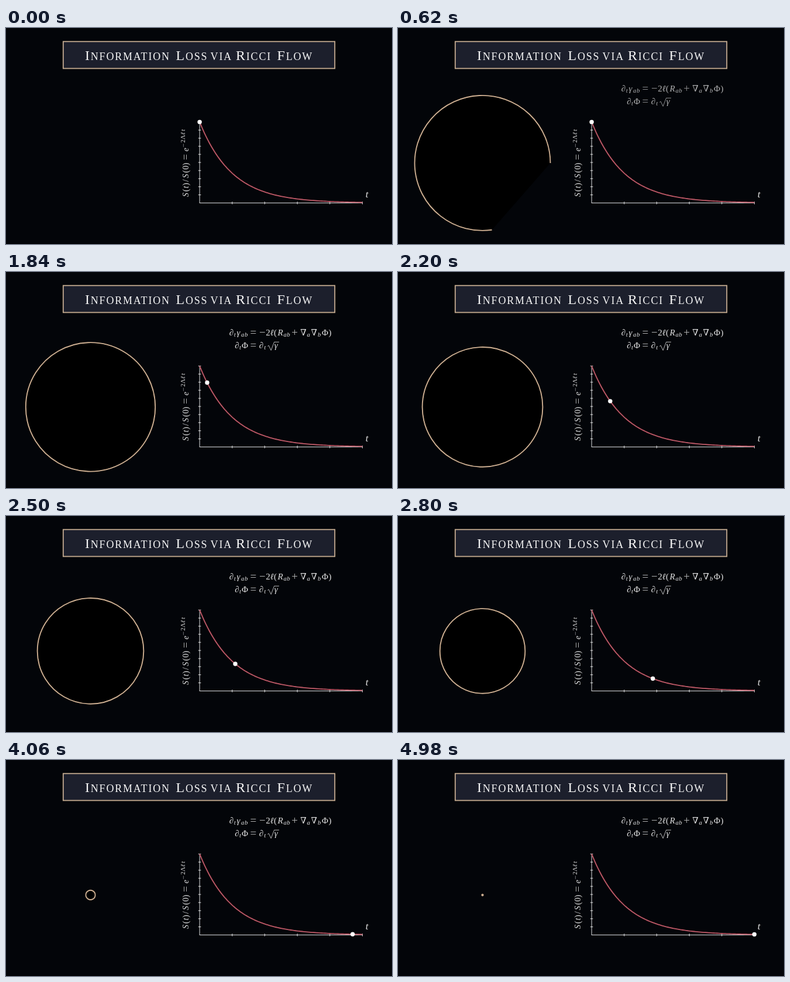
Recreate the animation shown at these times as an HTML page. Size 660 px wide and 371 px high, loop 5 s.

```html
<!DOCTYPE html>
<html lang="en">
<head>
<meta charset="utf-8">
<title>Information Loss via Ricci Flow</title>
<style>
  html, body { margin: 0; width: 100%; height: 100%; overflow: hidden; background: #030509; }
  svg { display: block; }
  text { font-family: "Liberation Serif", "DejaVu Serif", serif; fill: #e4e4e4; }
  .title { font-size: 18px; letter-spacing: 1.8px; fill: #f6f6f6; }
  .cap { font-size: 24px; }
  .it { font-style: italic; }
  .op { fill-opacity: .8; }
</style>
</head>
<body>
<svg width="660" height="371" viewBox="0 0 660 371">
  <rect y="370" width="660" height="1"/>
  <rect x="97.8" y="23.3" width="464.4" height="46.2" fill="#1c1f2c" stroke="#c6ac90" stroke-width="1.8"/>
  <text class="title" y="54.5">
    <tspan class="cap" x="135">I</tspan>NFORMATION
    <tspan class="cap" x="290.5">L</tspan>OSS
    <tspan x="349.6">VIA</tspan>
    <tspan class="cap" x="393">R</tspan>ICCI
    <tspan class="cap" x="463.5">F</tspan>LOW
  </text>
  <path id="ball" stroke="#d0b193" stroke-width="1.86"/>
  <g id="eqs">
    <path d="M447.3 127.6l1.9-1.4 4 8.3 5.4-14.2h8.4" fill="none" stroke="#e4e4e4" stroke-width=".8"/>
  </g>
  <g id="ylabel" transform="translate(312 290.5) rotate(-90)"></g>
  <g id="tlabel"></g>
  <path id="axes" stroke="#f0f0f0" stroke-width=".93"/>
  <path id="curve" fill="none" stroke="#be5866" stroke-width="1.86"/>
  <circle id="dot" r="3.7" fill="#fff"/>
</svg>
<script>
const $ = id => document.getElementById(id);
const OX = 331.1, OY = 300.5, W = 278.3, H = 139.1;
const CX = 144.5, CY = 231.9, R = 116;

function put(parent, y, size, cls, items) {
  for (const [x, str] of items) {
    const el = document.createElementNS("http://www.w3.org/2000/svg", "text");
    el.setAttribute("x", x);
    el.setAttribute("y", y);
    el.setAttribute("font-size", size);
    el.setAttribute("class", cls);
    el.textContent = str;
    $(parent).append(el);
  }
}

// Evolution equations
put("eqs", 108.8, 15, "it", [[381.8, "∂"], [394.6, "γ"], [451.8, "ℓ"], [464.4, "R"]]);
put("eqs", 108.8, 15, "", [[444.3, "2"], [458, "("], [503.2, "∇"], [521.6, "∇"], [540, "Φ"], [551.6, ")"]]);
put("eqs", 109.8, 19, "op", [[417.4, "="], [433, "−"], [488.2, "+"]]);
put("eqs", 111, 10.8, "it", [[389.8, "t"], [402, "a"], [408, "b"], [474.4, "a"], [480.2, "b"], [514.4, "a"], [533, "b"]]);
put("eqs", 131.2, 15, "it", [[391.2, "∂"], [432.8, "∂"], [458.8, "γ"]]);
put("eqs", 131.2, 15, "", [[403, "Φ"]]);
put("eqs", 132.2, 19, "op", [[417.4, "="]]);
put("eqs", 133.4, 10.8, "it", [[399, "t"], [441.2, "t"]]);

// Axis labels
put("ylabel", 0, 14, "it", [[0.6, "S"], [15.2, "t"], [32.8, "S"], [78.4, "e"]]);
put("ylabel", 0, 14, "", [[9.6, "("], [19.8, ")"], [26.6, "/"], [41.8, "("], [47.2, "0"], [54.2, ")"]]);
put("ylabel", 1, 18, "op", [[63.8, "="]]);
put("ylabel", -5.2, 12, "op", [[85.4, "−"]]);
put("ylabel", -5.6, 10.4, "", [[93.6, "2"], [99.2, "Λ"]]);
put("ylabel", -5.6, 10.4, "it", [[107, "ℓ"], [113.6, "t"]]);
put("tlabel", 290.8, 17.5, "it", [[614.8, "t"]]);

// Axes with ticks, then the decay curve
let axes = `M${OX} ${OY + .5}V${OY - H}M${OX} ${OY}H${OX + W}`;
for (let i = 1; i <= 5; i++) axes += `M${OX + W * i / 5} ${OY - 2.3}v4.6`;
for (let i = 1; i <= 10; i++) axes += `M${OX - 2.3} ${OY - H * i / 10}h4.6`;
$("axes").setAttribute("d", axes);

const point = p => [OX + W * p, OY - H * Math.exp(-5 * p)];
const samples = Array.from({ length: 101 }, (_, i) => point(i / 100));
$("curve").setAttribute("d", "M" + samples.join("L"));

const sigmoid = x => 1 / (1 + Math.exp(-x));
function smooth(t) {
  const e = sigmoid(-5);
  return Math.min(1, Math.max(0, (sigmoid(10 * (t - .5)) - e) / (1 - 2 * e)));
}

function arc(r, part) {
  if (part <= 0) return "";
  const a = 2 * Math.PI * Math.min(part, .9999);
  return `M${CX + r} ${CY}A${r} ${r} 0 ${+(part > .5)} 0 ${CX + r * Math.cos(a)} ${CY - r * Math.sin(a)}`;
}

function draw(ms) {
  const t = Math.floor(ms % 5000 / 20) * 20;
  const intro = smooth(Math.min(1, t / 1000));
  const decay = smooth(Math.max(0, (t - 1000) / 4000));
  $("eqs").setAttribute("opacity", intro);
  $("ball").setAttribute("d", arc(R * (1 - .99 * decay), intro));
  const [x, y] = point(decay);
  $("dot").setAttribute("cx", x);
  $("dot").setAttribute("cy", y);
}

const start = performance.now();
function tick() {
  draw(performance.now() - start);
  requestAnimationFrame(tick);
}
tick();
</script>
</body>
</html>
```
